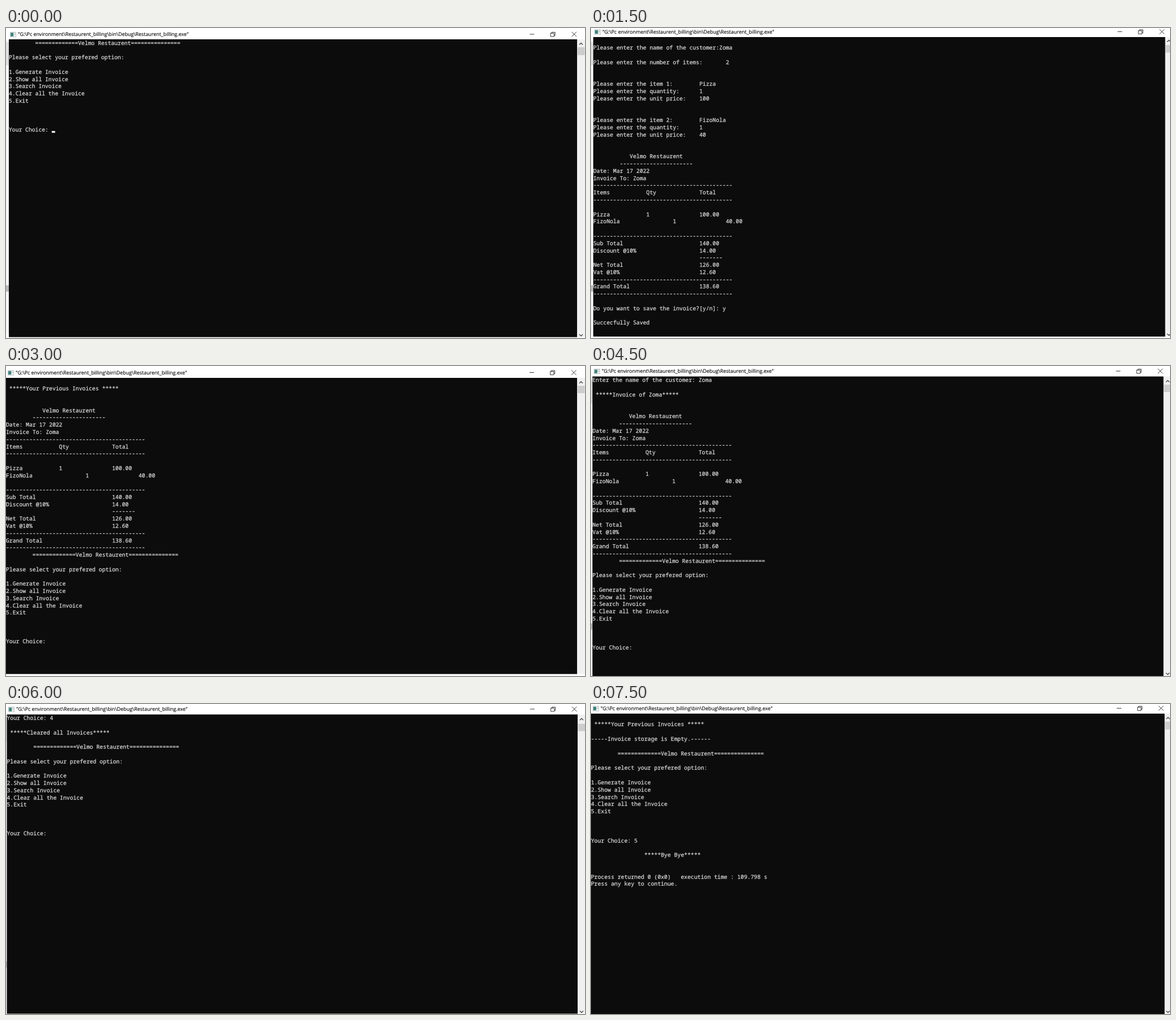
Animation of 1022x548 px, one loop 9 s. Source, as an HTML page with a canvas:

```html
<!DOCTYPE html>
<html lang="en">
<head>
<meta charset="utf-8">
<title>Restaurant billing console</title>
<style>
  html, body { margin: 0; width: 100%; height: 100%; overflow: hidden; background: #fff; }
  canvas { display: block; }
</style>
</head>
<body>
<canvas id="stage" width="1022" height="548"></canvas>
<script>
const W = 1022, H = 548, HOLD = 1500;
const ctx = document.getElementById('stage').getContext('2d');
ctx.textRendering = 'geometricPrecision';

const PATH = '"G:\\Pc environment\\Restaurent_billing\\bin\\Debug\\Restaurent_billing.exe"';
const SHOP = 'Velmo Restaurent';
const GUEST = 'Zoma';
const DRINK = 'FizoNola';
const RULE = '-'.repeat(42);

const menu = (choice = '') => [
  '\t' + '='.repeat(13) + SHOP + '='.repeat(15), '',
  'Please select your prefered option:', '',
  '1.Generate Invoice',
  '2.Show all Invoice',
  '3.Search Invoice',
  '4.Clear all the Invoice',
  '5.Exit', '', '', '',
  'Your Choice: ' + choice
];

const invoice = [
  '\t   ' + SHOP,
  '\t' + '-'.repeat(22),
  'Date: Mar 17 2022',
  'Invoice To: ' + GUEST,
  RULE, 'Items\t\tQty\t\tTotal', RULE, '',
  'Pizza\t\t1\t\t100.00',
  DRINK + '\t\t1\t\t40.00', '',
  RULE,
  'Sub Total\t\t\t140.00',
  'Discount @10%\t\t\t14.00',
  '\t\t\t\t-------',
  'Net Total\t\t\t126.00',
  'Vat @10%\t\t\t12.60',
  RULE, 'Grand Total\t\t\t138.60', RULE
];

const order = (n, name, price) => [
  `Please enter the item ${n}:\t${name}`,
  'Please enter the quantity:\t1',
  `Please enter the unit price:\t${price}`, '', ''
];

// box: console edges; text: left, first row centre, column and row pitch;
// title: left, centre, width; min: left of the minimise mark;
// bar: arrow x, up arrow y, down arrow y, thumb top and bottom
const scenes = [
  {
    box: [5, 20, 1008, 546.5], text: [5, 27, 5.83, 12.72], title: [21, 11.5, 303],
    min: 924.5, bar: [1015, 28, 543, 34, 48], cursor: true,
    lines: menu()
  },
  {
    box: [4, 16, 1013.5, 545.5], text: [4, 35.5, 5.857, 12.79], title: [20, 7, 305],
    min: 929.5, bar: [1020, 23, 542, 30, 43.5],
    lines: ['Please enter the name of the customer:' + GUEST, '',
      'Please enter the number of items:\t2', '', '',
      ...order(1, 'Pizza', 100), ...order(2, DRINK, 40), ...invoice, '',
      'Do you want to save the invoice?[y/n]: y', '', 'Succecfully Saved']
  },
  {
    box: [0, 21, 1008, 544.5], text: [0, 40.5, 5.857, 12.77], title: [17, 12, 304],
    min: 924, bar: [1015, 29, 0, 35, 48],
    lines: [' *****Your Previous Invoices *****', '', '', ...invoice, ...menu()]
  },
  {
    box: [2.5, 18.5, 1010.5, 548], text: [2.5, 25.5, 5.865, 12.77], title: [19, 9.5, 305],
    min: 926.5, bar: [1018, 27, 544, 33, 46],
    lines: ['Enter the name of the customer: ' + GUEST, '',
      ` *****Invoice of ${GUEST}*****`, '', '', ...invoice, ...menu()]
  },
  {
    box: [1.5, 18.5, 1009, 547.5], text: [1.5, 25.5, 5.856, 12.75], title: [18, 9.5, 304],
    min: 925, bar: [1016, 27, 544, 35, 48],
    lines: ['Your Choice: 4', '', ' *****Cleared all Invoices*****', '', ...menu()]
  },
  {
    box: [0, 17, 1012.5, 548], text: [0, 36.5, 5.875, 12.82], title: [17, 8, 305],
    min: 928, bar: [1018.5, 25, 544, 31, 45],
    lines: [' *****Your Previous Invoices *****', '',
      '-----Invoice storage is Empty.------', '', ...menu('5'), '',
      '\t\t*****Bye Bye*****', '', '',
      'Process returned 0 (0x0)   execution time : 109.798 s',
      'Press any key to continue.']
  }
];

function rect(color, l, t, r, b) {
  ctx.fillStyle = color;
  ctx.fillRect(l, t, r - l, b - t);
}

function stroke(color, width, ...paths) {
  ctx.strokeStyle = color;
  ctx.lineWidth = width;
  ctx.beginPath();
  for (const [start, ...rest] of paths) {
    ctx.moveTo(...start);
    rest.forEach(p => ctx.lineTo(...p));
  }
  ctx.stroke();
}

// A hairline outline gives the small type its screen weight.
function write(text, x, y, color, outline) {
  ctx.fillStyle = ctx.strokeStyle = color;
  ctx.lineWidth = outline;
  ctx.lineJoin = 'round';
  ctx.fillText(text, x, y);
  ctx.strokeText(text, x, y);
}

function expandTabs(line) {
  return line.split('\t').reduce((out, part) =>
    out.padEnd((Math.floor(out.length / 8) + 1) * 8) + part);
}

function drawTitle({ title: [x, y, width], min }) {
  const left = x - 14;
  rect('#a9b5b5', left, y - 4.5, left + 11, y + 4.5);
  rect('#f4f6f6', left + 0.7, y - 3.6, left + 10.3, y + 3.8);
  rect('#3b7f78', left + 1.2, y - 3, left + 6.2, y + 3.2);
  rect('#b8c4c4', left + 7.6, y - 2.4, left + 9.2, y + 1);

  ctx.font = `${width / 34.13}px "Open Sans", "Noto Sans", sans-serif`;
  write(PATH, x, y + 2.9, '#000', 0.12);

  const box = min + 36.7, cross = min + 74;
  stroke('#222', 0.9,
    [[min, y - 0.5], [min + 8, y - 0.5]],
    [[box, y - 2.2], [box + 6.2, y - 2.2], [box + 6.2, y + 3.6], [box, y + 3.6], [box, y - 2.6]],
    [[box + 1.9, y - 2.2], [box + 1.9, y - 4], [box + 8, y - 4], [box + 8, y + 1.8], [box + 6.2, y + 1.8]],
    [[cross, y - 4.7], [cross + 8.5, y + 3.8]],
    [[cross + 8.5, y - 4.7], [cross, y + 3.8]]);
}

function drawBar({ box: [, top, right, bottom], bar: [x, up, down, from, to] }) {
  rect('#f0f0f0', right, top, W, bottom);
  rect('#cdcdcd', right + 0.8, from, Math.min(W, right + 13.5), to);
  const arrow = (y, d) => stroke('#505050', 1.5, [[x - 3, y + d], [x, y - d], [x + 3, y + d]]);
  arrow(up, 1.5);
  if (down) arrow(down, -1.5);
}

function drawEdge(left) {
  if (!left) return;
  rect('#f5f5f5', 0, 22, left, 540);
  rect('#dedede', 0, 25, left, 66);
  rect('#b9b9b9', 0, 455, left, 466);
}

function drawConsole({ box, text: [x, y, col, row], lines, cursor }) {
  rect('#0c0c0c', ...box);
  ctx.font = `${col / 0.6}px "Noto Sans Mono", "DejaVu Sans Mono", monospace`;
  lines.forEach((line, i) => write(expandTabs(line), x, y + 2.9 + i * row, '#dadada', 0.25));
  if (cursor) {
    const cx = x + lines.at(-1).length * col;
    const cy = y + (lines.length - 1) * row + 2.4;
    rect('#f2f2f2', cx, cy, cx + col, cy + 3.2);
  }
}

function draw(scene) {
  rect('#fff', 0, 0, W, H);
  drawEdge(scene.box[0]);
  drawTitle(scene);
  drawBar(scene);
  drawConsole(scene);
}

const start = performance.now();
function tick() {
  const t = performance.now() - start;
  draw(scenes[Math.floor(t / HOLD) % scenes.length]);
  requestAnimationFrame(tick);
}
tick();
</script>
</body>
</html>
```
